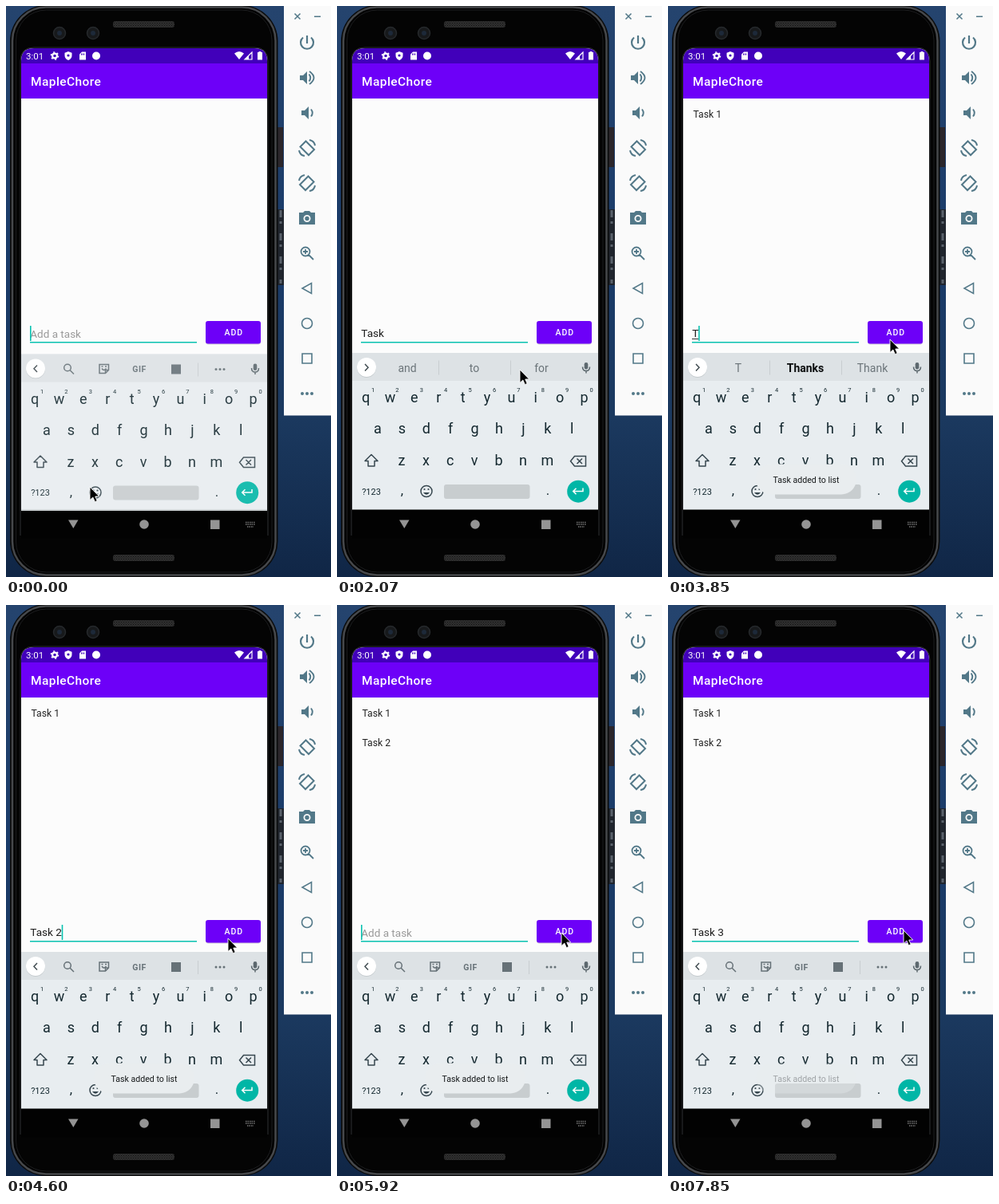
Animation, 407 px wide and 716 px high, one loop 8000 ms. Source, as an HTML page:

```html
<!DOCTYPE html>
<html lang="en">
<head>
<meta charset="utf-8">
<title>Task list demo</title>
<style>
  html, body { margin: 0; width: 100%; height: 100%; overflow: hidden; background: #17315a; }
  svg { display: block; width: 100vw; height: 100vh; }
  text { font-family: Roboto, "Noto Sans", sans-serif; white-space: pre; }
  .mid { text-anchor: middle; }
  .line { fill: none; stroke: currentColor; stroke-width: 1.5; }
  .solid { fill: currentColor; }
</style>
</head>
<body>
<svg viewBox="0 0 407 716" xmlns="http://www.w3.org/2000/svg">
  <defs>
    <linearGradient id="sea" x2="0" y2="1">
      <stop offset="0" stop-color="#25446e"/><stop offset=".45" stop-color="#1a3b69"/>
      <stop offset=".72" stop-color="#1b395f"/><stop offset="1" stop-color="#102646"/>
    </linearGradient>
    <pattern id="mesh" width="3" height="3" patternUnits="userSpaceOnUse">
      <path d="M0 0h3v3h-3z" fill="#303030"/><path d="M0 0h1v1h-1zM1.5 1.5h1v1h-1z" fill="#121212"/>
    </pattern>
    <clipPath id="screen"><path d="M19 668V69q0-16 16-16H311q16 0 16 16V668z"/></clipPath>
  </defs>

  <!-- desktop and phone body -->
  <rect width="407" height="716" fill="url(#sea)"/>
  <path d="M339 152h8v50h-8z" fill="#2b262b"/>
  <path d="M339 255h9v95h-9z" fill="#20252d"/>
  <path d="M344 256v92" stroke="#5a626c" stroke-width="3" stroke-dasharray="9 5 3 12"/>
  <rect x="5" y="-1" width="335.500" height="717" rx="45" fill="#0b0c0d"/>
  <rect x="8" y="1.500" width="329.500" height="712" rx="42" fill="#020202" stroke="#46484b" stroke-width="2.500"/>
  <rect x="12.500" y="5" width="320.500" height="705" rx="38" fill="#040404" stroke="#1d1e20"/>
  <path d="M18 664V69q0-17 17-17H311q17 0 17 17V664" fill="none" stroke="#2c2e31"/>
  <g fill="url(#mesh)">
    <rect x="134" y="19" width="77" height="8" rx="3"/>
    <rect x="134" y="688" width="77" height="8" rx="3"/>
  </g>
  <g fill="#17191b" stroke="#26292c" stroke-width="1.500">
    <circle cx="67" cy="34" r="7.500"/><circle cx="109" cy="34" r="7.500"/>
  </g>
  <g fill="#1d2939"><circle cx="67" cy="34" r="3"/><circle cx="109" cy="34" r="3"/></g>

  <!-- app -->
  <g clip-path="url(#screen)">
    <path d="M19 53H327V631H19z" fill="#fcfcfc"/>
    <path d="M19 53H327V72H19z" fill="#4100ba"/>
    <path d="M19 72H327V116H19z" fill="#6d00f8"/>
  </g>
  <g fill="#fff" color="#fff">
    <text x="25" y="67" font-size="11.500">3:01</text>
    <circle cx="61" cy="62.500" r="2.900" class="line" style="stroke-width:2.200"/>
    <circle cx="61" cy="62.500" r="4.500" class="line" style="stroke-dasharray:2 2.710;stroke-width:1.600"/>
    <path d="M78 57l4.500 1.800v3.200q0 4-4.500 6-4.500-2-4.500-6v-3.200z"/>
    <circle cx="78" cy="62" r="1.600" fill="#4100ba"/>
    <path d="M95 57.500h5v10h-8v-7z"/>
    <path d="M94.500 59.500v2m1.700-2v2m1.700-2v2" stroke="#4100ba"/>
    <circle cx="113" cy="62.500" r="5"/>
    <path d="M286 59.500q6-5 12 0l-6 7.500z"/>
    <path d="M308 58v9h-9z" class="line" style="stroke-width:1.200"/><path d="M304 62v5h-5z"/>
    <path d="M316.500 57h3v1h1.500v9.500h-6V58h1.500z"/>
    <text x="31" y="100" font-size="15.500" font-weight="500" letter-spacing=".4">MapleChore</text>
  </g>
  <g font-size="12.200" fill="#222">
    <text id="task1" x="31.500" y="139.500">Task 1</text>
    <text id="task2" x="31.500" y="177">Task 2</text>
  </g>
  <text id="hint" x="30.300" y="415.500" font-size="13.500" fill="#999">Add a task</text>
  <text id="entry" x="30.300" y="415.300" font-size="13.600" fill="#1c1c1c"></text>
  <path id="underline" stroke="#333" stroke-width="1"/>
  <path d="M30 421.700H239" stroke="#08c2b0" stroke-width="1.500"/>
  <path id="caret" d="M0 401V420" stroke="#08c2b0" stroke-width="1.600"/>
  <rect x="250" y="396" width="69" height="28.500" rx="3" fill="#000" opacity=".15"/>
  <rect id="button" x="250" y="395" width="69" height="28.500" rx="3"/>
  <text x="285.300" y="413" class="mid" font-size="10.500" font-weight="500" letter-spacing=".9" fill="#fff">ADD</text>

  <!-- navigation bar -->
  <path d="M19 631H327V668H19z" fill="#020202"/>
  <g fill="#949494">
    <path d="M78 644.500h12.500l-6.200 10.500z"/><circle cx="173" cy="650" r="5.800"/>
    <path d="M256 644.500h11.500v11.500h-11.500z"/>
    <path d="M300 647.500h12M300 650h12M302 653h8" stroke="#777" stroke-width="1.500" stroke-dasharray="1.500 1"/>
  </g>

  <!-- keyboard -->
  <g id="keyboard">
    <path d="M19 435H327V631.500H19z" fill="#e8edf0"/>
    <path d="M19 435H327V470H19z" fill="#dde2e5"/>
    <circle cx="37" cy="453.700" r="12" fill="#bcc3c7"/><circle cx="37" cy="453" r="12" fill="#fff"/>
    <path id="chevron" class="line" color="#424d52"/>
    <g id="tools" color="#667177">
      <circle cx="77" cy="452" r="4.300" class="line"/><path d="M80 455l5 5" class="line"/>
      <path d="M117 448h11.500v7l-4 4h-7.500zM128.500 455h-4v4" class="line"/>
      <path d="M120 453q2.700 4 5.500 0" class="line"/>
      <path d="M119.500 450.500h2m2.500 0h2" class="line"/>
      <text x="167" y="457.500" class="mid solid" font-size="10.500" font-weight="700" letter-spacing=".5">GIF</text>
      <rect x="207" y="448" width="12" height="12" class="solid"/>
      <path d="M240.500 446v17" stroke="#c8cdd0"/>
      <g class="solid"><circle cx="263" cy="454" r="1.500"/><circle cx="268" cy="454" r="1.500"/><circle cx="273" cy="454" r="1.500"/></g>
    </g>
    <g id="suggestions">
      <path d="M127.500 444.500v18M217.500 444.500v18" stroke="#c8cdd0"/>
    </g>
    <g color="#5c686e">
      <rect x="309.700" y="447" width="4.600" height="8.500" rx="2.300" class="solid"/>
      <path d="M307.500 452.500q0 5 4.500 5t4.500-5M312 457.500v3" class="line"/>
    </g>
    <g id="keys" fill="#14282f"></g>
    <g color="#37474f">
      <path d="M43 562.500l8 8h-4v6.500h-8v-6.500h-4z" class="line" stroke-linejoin="round"/>
      <path d="M297.500 564.500h14v12.500h-14l-5-6.200zM300.500 567.500l6.500 6.500m0-6.500l-6.500 6.500" class="line"/>
      <circle cx="112" cy="608.500" r="7" class="line"/>
      <path d="M108 610q4 5.500 8 0z" class="solid"/>
      <circle cx="109.500" cy="606" r="1.100" class="solid"/><circle cx="114.500" cy="606" r="1.100" class="solid"/>
    </g>
    <rect x="134" y="600" width="107.500" height="18" rx="3" fill="#c8cdcf"/>
    <circle cx="302.200" cy="608.700" r="14" fill="#00b6a6"/>
    <path d="M308 604.500v4h-12m3.500-3.800l-3.800 3.800 3.800 3.800" class="line" color="#fff"/>
  </g>

  <g id="toast">
    <rect x="110" y="574.500" width="126" height="38" rx="19" fill="#e9edef"/>
    <text x="173" y="598" class="mid" font-size="10.600" fill="#16191a">Task added to list</text>
  </g>

  <!-- emulator side panel -->
  <path d="M348 0H407V513.500H348z" fill="#fafafa"/>
  <g color="#527888">
    <path d="M361.500 9.500l7 7m0-7l-7 7M386 13.200h8" class="line"/>
    <g id="panel"></g>
  </g>

  <path id="pointer" d="M0 0V16.500L3.800 13 6.400 18.700 9.200 17.500 6.800 12H11.700Z" fill="#000" stroke="#fff" stroke-width=".9"/>
</svg>

<script>
const LOOP = 8000;
const $ = id => document.getElementById(id);

function add(parent, tag, attrs, content = '') {
  const node = document.createElementNS('http://www.w3.org/2000/svg', tag);
  for (const name in attrs) node.setAttribute(name, attrs[name]);
  node.textContent = content;
  return parent.appendChild(node);
}

// Keys
const keyStep = 30.4;
const key = (x, y, label, size = 18) =>
  add($('keys'), 'text', { x, y, class: 'mid', 'font-size': size }, label);
[['qwertyuiop', 36, 497], ['asdfghjkl', 51, 536], ['zxcvbnm', 81, 576]].forEach(([row, x, y]) =>
  [...row].forEach((letter, i) => key(x + i * keyStep, y, letter)));
[...'1234567890'].forEach((digit, i) => key(45 + i * keyStep, 484, digit, 7.5));
key(43, 612.5, '?123', 11);
key(81.5, 613, ',', 17);
key(264, 613, '.', 17);

// Panel icons, centred on 0,0 and 44 px apart
const rotate = 'M-1.500 -8.500L9 2 2 9 -8.500 -1.500ZM-10 3Q-9 9 -3 10M10 -3Q9 -9 3 -10';
const speaker = 'M-9 -3h4l5 -5v16l-5 -5h-4z';
const dots = [-6, 0, 6].map(x => `M${x - 2} 0a2 2 0 1 0 4 0a2 2 0 1 0 -4 0`).join('');
const icons = [
  { line: 'M0 -9V1M-5 -6.500A8 8 0 1 0 5 -6.500', width: 2.2 },
  { solid: speaker, line: 'M2.500 -4.500Q6 0 2.500 4.500M3 -8Q14 0 3 8', width: 1.9 },
  { solid: speaker, line: 'M3 -4.500Q6.500 0 3 4.500', width: 1.9, shift: 2 },
  { line: rotate, width: 2 },
  { line: rotate, width: 2, flip: -1 },
  { solid: 'M-10 -7h5l2 -2h6l2 2h5v15h-20zM-4.500 .5a4.500 4.500 0 1 0 9 0a4.500 4.500 0 1 0 -9 0M-2.700 .5a2.700 2.700 0 1 0 5.400 0a2.700 2.700 0 1 0 -5.400 0' },
  { line: 'M-7.500 -2a5.500 5.500 0 1 0 11 0a5.500 5.500 0 1 0 -11 0M2 2L8 8M-5 -2h6M-2 -5v6', width: 1.8 },
  { line: 'M5.500 -6.500V6.500L-6 0Z' },
  { line: 'M-6.500 0a6.500 6.500 0 1 0 13 0a6.500 6.500 0 1 0 -13 0' },
  { line: 'M-6 -6h12v12h-12z' },
  { solid: dots }
];
icons.forEach(({ line, solid, width = 1.6, flip = 1, shift = 0 }, i) => {
  const group = add($('panel'), 'g', { transform: `translate(${377 + shift} ${46 + 44 * i}) scale(${flip} 1)` });
  if (solid) add(group, 'path', { d: solid, class: 'solid', 'fill-rule': 'evenodd' });
  if (line) add(group, 'path', { d: line, class: 'line', style: `stroke-width:${width}` });
});

const words = [88, 172, 256].map(x =>
  add($('suggestions'), 'text', { x, y: 458.5, class: 'mid', 'font-size': 14 }));
const predictions = {
  'T': ['T', 'Thanks', 'Thank'],
  'Ta': ['Ta', 'Take', 'Talk'],
  'Tas': ['Tas', 'Task', 'Tasks'],
  'Task': ['Task', 'Tasks', 'Talk'],
  'Task ': ['and', 'to', 'for']
};

// Step tables: [start in ms, value]
const typing = (times, full) => times.map((t, i) => [t, full.slice(0, i + 1)]);
const tracks = {
  text: [[0, ''],
    ...typing([890, 1040, 1180, 1330, 1480, 2370], 'Task 1'), [2950, ''],
    ...typing([3850, 4000, 4150, 4300, 4440, 4590], 'Task 2'), [5630, ''],
    ...typing([6370, 6520, 6670, 6810, 6960, 7110], 'Task 3')],
  caret: [[0, 1], [150, 0], [890, 1], [1930, 0], [2370, 1], [2800, 0], [2950, 1], [3400, 0],
    [3850, 1], [5040, 0], [5630, 1], [6070, 0], [6370, 1], [7550, 0]],
  pointer: [[0, [105, 603]], [1780, [135, 570]], [1930, [182, 508]], [2070, [229, 456]],
    [2220, [252, 438]], [2370, [265, 428]], [2520, [273, 422]], [2660, [278, 418]],
    [4740, [300, 404]], [4890, [322, 394]], [5040, [338, 396]], [5190, [308, 404]], [5330, [281, 411]],
    [7260, [288, 410]], [7400, [294, 409]], [7700, [295, 408]]],
  toast: [[0, 0], [2950, .35], [3100, .75], [3250, 1], [5040, .75], [5190, .35], [5330, .07], [5480, 0],
    [5630, .25], [5780, .7], [5920, 1], [7550, .85], [7700, .6], [7850, .34]],
  button: [[0, '#6d00f8'], [2800, '#8230fa'], [2950, '#7718f9'], [3100, '#6d00f8'],
    [5480, '#8230fa'], [5630, '#7718f9'], [5780, '#6d00f8']],
  slide: [[0, 1.5], [150, .6], [300, 0]]
};
const at = (name, t) => tracks[name].findLast(([start]) => start <= t)[1];
const show = (id, visible) => $(id).style.display = visible ? '' : 'none';

function draw(t) {
  const text = at('text', t);
  const guesses = predictions[text];
  $('entry').textContent = text;
  const width = text ? $('entry').getComputedTextLength() : 0;
  show('hint', !text);
  show('task1', t >= 2950);
  show('task2', t >= 5630);

  const composing = guesses && !text.endsWith(' ');
  $('underline').setAttribute('d', composing ? `M30 417.500h${width}` : '');
  show('caret', at('caret', t));
  $('caret').setAttribute('transform', `translate(${30.8 + width} 0)`);

  show('tools', !guesses);
  show('suggestions', guesses);
  $('chevron').setAttribute('d', guesses ? 'M35 449l4 4.200-4 4.200' : 'M39 449l-4 4.200 4 4.200');
  if (guesses) words.forEach((word, i) => {
    const bold = text === 'T' && i === 1;
    word.textContent = guesses[i];
    word.setAttribute('font-weight', bold ? 700 : 400);
    word.setAttribute('fill', bold ? '#0b0d0e' : '#6b7479');
  });

  const slide = at('slide', t);
  $('keyboard').setAttribute('transform', `translate(0 ${slide})`);
  $('keyboard').setAttribute('opacity', 1 - slide * .07);
  $('toast').setAttribute('opacity', at('toast', t));
  $('button').setAttribute('fill', at('button', t));
  $('pointer').setAttribute('transform', `translate(${at('pointer', t)})`);
}

const start = performance.now();
function tick() {
  draw((performance.now() - start) % LOOP);
  requestAnimationFrame(tick);
}
tick();
</script>
</body>
</html>
```
